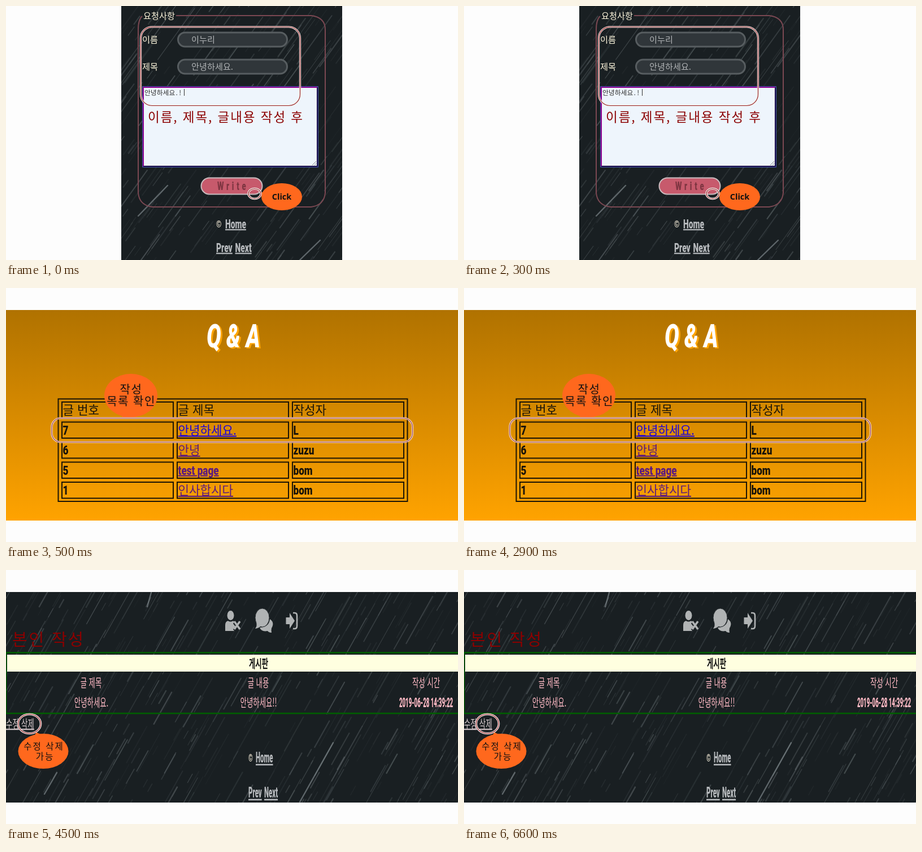
An HTML page for the animation above (8000 ms loop, 800x450 px).

```html
<!DOCTYPE html>
<html lang="ko">
<head>
<meta charset="utf-8">
<title>Q &amp; A board</title>
<style>
  html, body { margin: 0; width: 100%; height: 100%; overflow: hidden; background: #fdfdfd; }
  svg { display: block; }
  #stage { width: 100vw; height: 100vh; }
  text { font-family: "Noto Sans CJK KR", "Noto Sans CJK", "Noto Sans CJK JP", sans-serif; white-space: pre; }
  .heavy { font-family: Roboto, "Noto Sans CJK KR", sans-serif; font-weight: 900; }
  .label { font-family: "Open Sans", sans-serif; font-weight: 700; }
  .mono { font-family: "Noto Sans Mono CJK KR", "Noto Sans CJK KR", monospace; }
  .bold { font-weight: 700; }
  .link { text-decoration: underline; }
</style>
</head>
<body>
<svg id="stage" viewBox="0 0 800 450"></svg>
<script>
const LOOP = 8000;
const STARTS = [0, 500, 4500];
const ORANGE = '#ff681d', DARK_RED = '#8b0000', PINK = '#ffb9c4', SILVER = '#b7babd';

function text(str, x, y, size, fill, { cls = '', squeeze = 1, gap = 0, anchor = 'start', style = '' } = {}) {
  return `<text class="${cls}" transform="translate(${x} ${y}) scale(${squeeze} 1)" font-size="${size}"
    fill="${fill}" letter-spacing="${gap}" text-anchor="${anchor}" style="${style}">${str}</text>`;
}

function box(x, y, w, h, r, fill, stroke = 'none', width = 0) {
  return `<rect x="${x}" y="${y}" width="${w}" height="${h}" rx="${r}" fill="${fill}" stroke="${stroke}" stroke-width="${width}"/>`;
}

const path = (d, fill, stroke = 'none', width = 0) =>
  `<path d="${d}" fill="${fill}" stroke="${stroke}" stroke-width="${width}"/>`;

// Highlight outline: white line with a thin red core
const outline = (x, y, w, h, r) =>
  box(x, y, w, h, r, 'none', '#f6eeee', 3.2) + box(x, y, w, h, r, 'none', '#922222', 1.1);

const oval = (cx, cy, rx, ry) => ['#f6eeee', '#922222'].map((color, i) =>
  `<ellipse cx="${cx}" cy="${cy}" rx="${rx}" ry="${ry}" fill="none" stroke="${color}" stroke-width="${i ? 1.1 : 3.6}"/>`).join('');

const bubble = (cx, cy, rx, ry, tail) =>
  `<ellipse cx="${cx}" cy="${cy}" rx="${rx}" ry="${ry}" fill="${ORANGE}"/>` + path(tail, ORANGE);

function randomFrom(seed) {
  return () => (seed = (seed * 16807) % 2147483647) / 2147483647;
}

// Slanted streaks over a dark ground; lean is the sideways run per unit of height
function rain(x, y, w, h, lean, count, bright) {
  const random = randomFrom(4711);
  let streaks = '';
  for (let i = 0; i < count; i++) {
    const length = 12 + 85 * random() ** 2;
    const sx = random() * (w + 80) - 60, sy = random() * (h + 70);
    const opacity = 0.05 + 0.24 * random() ** 2;
    streaks += `<path d="M${sx.toFixed(1)} ${sy.toFixed(1)}l${(length * lean).toFixed(1)} ${(-length).toFixed(1)}"
      stroke-opacity="${opacity.toFixed(2)}" stroke-width="${(0.8 + 1.5 * random()).toFixed(1)}"/>`;
  }
  return `<svg x="${x}" y="${y}" width="${w}" height="${h}">
    <rect width="100%" height="100%" fill="#191f22"/>
    <g stroke="#aab5b8" stroke-linecap="round">${streaks}
    <path d="${bright}" stroke-opacity=".48" stroke-width="2.4"/></g></svg>`;
}

function footer(x, linkX, nextX, y1, y2, size, squeeze) {
  const link = { cls: 'heavy link', squeeze };
  return text('©', x, y1 - 2, size * 0.72, '#fff5e0', { cls: 'heavy', squeeze: squeeze * 1.2 }) +
    text('Home', linkX, y1, size, SILVER, link) +
    text('Prev', x, y2, size, SILVER, link) +
    text('Next', nextX, y2, size, SILVER, link);
}

function formScene() {
  const field = (y, label, value) =>
    text(label, 241, y + 19, 15.2, '#fff6dc') +
    box(304.5, y + 1, 193, 25, 12.5, '#30363a', '#575d60', 3) +
    text(value, 328, y + 19, 15.2, '#b0b3b5');
  return rain(204, 0, 391, 450, 0.72, 330, 'M316 450L352 415M30 372L82 318') +
    path('M301 17H540Q565 20 565 42V331Q563 353 540 356H259Q236 353 234 331V42Q234 24 241 18', 'none', '#7b4852', 2) +
    text('요청사항', 243, 22.5, 15.2, '#fff6dc') +
    field(46, '이름', '이누리') +
    field(94, '제목', '안녕하세요.') +
    box(241, 142, 312, 144, 1, '#4054a8') +
    path('M242 143H552L549 146H245V282L242 285Z', '#8b008b') +
    path('M552 143V285H242L245 282H549V146Z', '#1b0d45') +
    box(244, 145, 306, 138, 0, '#eef5fc') +
    path('M542 282l7-7M546 282l3-3', 'none', '#888', 1) +
    text('안녕하세요.!', 245, 157.5, 11.8, '#333', { cls: 'mono', style: 'font-weight:300' }) +
    path('M315.5 147V159', 'none', '#333', 1) +
    outline(238.5, 37, 282, 139.5, 20) +
    text('이름, 제목, 글내용 작성 후', 251, 204.5, 22.5, DARK_RED, { gap: 1.95 }) +
    box(345.5, 304.5, 108, 29, 14.5, '#c75a6c', '#c9bcbf', 2) +
    text('Write', 374, 326, 21, '#7e3541', { cls: 'heavy', squeeze: 0.63, gap: 7.5 }) +
    bubble(488, 338, 36, 24, 'M449 331Q458 331 464 320L460 348Q456 337 449 331Z') +
    oval(440, 332.5, 11, 9) +
    text('Click', 488, 343, 14.5, '#111', { cls: 'label', anchor: 'middle' }) +
    footer(372, 388, 405.5, 394, 436, 22, 0.63);
}

function listScene() {
  const rows = [['글 번호', '글 제목', '작성자'], ['7', '안녕하세요.', 'L'], ['6', '안녕', 'zuzu'],
    ['5', 'test page', 'bom'], ['1', '인사합시다', 'bom']];
  let table = box(92.5, 196.5, 618, 181.5, 0, 'none', '#1b1405', 2);
  rows.forEach((row, r) => row.forEach((str, c) => {
    const x = 99 + 204 * c, y = 202 + 35.5 * r;
    const latin = /^\w/.test(str);
    const isLink = r > 0 && c === 1;
    const color = !isLink ? '#17130a' : r === 1 ? '#1800e0' : '#5b1a80';
    table += box(x, y, 197, 28.5, 0, 'none', '#1b1405', 2) +
      text(str, x + 1.5, y + 22, latin ? 22 : 21.2, color,
        { cls: (latin ? 'heavy' : '') + (isLink ? ' link' : ''), squeeze: latin ? 0.78 : 1 });
  }));
  const title = (x, y, color) => text('Q &amp; A', x, y, 57, color,
    { cls: 'heavy', squeeze: 0.67, style: 'font-style:italic' });
  return `<linearGradient id="amber" x2="0" y2="1"><stop stop-color="#b07200"/>
    <stop offset="1" stop-color="#ffa300"/></linearGradient>` +
    box(0, 39, 800, 373, 0, 'url(#amber)') +
    title(358, 106.5, '#ffa500') + title(355, 104.5, '#fff') +
    table +
    bubble(221, 190.5, 47, 38.5, 'M196 220Q208 225 205 232L233 228Z') +
    text('작성', 221.5, 187, 20, '#111', { gap: 1.5, anchor: 'middle' }) +
    text('목록 확인', 221.5, 208, 20, '#111', { gap: 1.5, anchor: 'middle' }) +
    outline(81, 230.5, 638.5, 42.5, 16);
}

function icons() {
  return `<g fill="#b0b3b4"><ellipse cx="397.5" cy="80.5" rx="6" ry="8.5"/>` +
    path('M388 108V98Q388 91 393 90Q397 93 402 90L404 92L402 95L406 100L402 105L404 108Z', '#b0b3b4') +
    path('M404 91L414 105M414 91L404 105', 'none', '#b0b3b4', 3.6) +
    path('M470 111Q465 111 463 108Q452 110 449 102Q466 101 467 87Q476 93 470 103Q469 107 470 111Z', '#b0b3b4') +
    `<ellipse cx="453.5" cy="84.5" rx="12.5" ry="16.5" stroke="#22282b"/>` +
    path('M443 92Q445 99 441 104Q448 103 451 99Z', '#b0b3b4') +
    path('M495.5 84H502V76L511 90L502 104V96H495.5Z', '#b0b3b4') +
    path('M508 76H511Q515 76 515 81V99Q515 104 511 104H508', 'none', '#b0b3b4', 2.6) + '</g>';
}

function postScene() {
  const squeeze = 0.59;
  const cell = (str, x, y) => text(str, x, y, 21, PINK, { squeeze, anchor: 'middle' });
  const action = (str, x) => text(str, x, 280, 21, '#d6c9cc', { cls: 'link', squeeze });
  return rain(0, 39, 800, 373, 0.56, 520, 'M520 372L579 267M68 358L90 320M250 26L257 1') +
    icons() +
    text('본인 작성', 11, 134, 29, DARK_RED, { gap: 2.8 }) +
    box(0, 146.5, 820, 107.5, 0, 'none', '#005f00', 2.6) +
    box(2, 150, 798, 30, 0, '#ffffe0') +
    text('게시판', 447, 173, 21, '#111', { cls: 'bold', squeeze, anchor: 'middle' }) +
    cell('글 제목', 150.5, 206.5) + cell('글 내용', 446.5, 206.5) + cell('작성 시간', 743.5, 206.5) +
    cell('안녕하세요.', 151, 242) + cell('안녕하세요!!', 447, 242) +
    text('2019-06-28 14:39:22', 743.5, 242.5, 23, PINK, { cls: 'heavy', squeeze: 0.42, anchor: 'middle' }) +
    action('수정', 0) + action('삭제', 27) +
    bubble(66, 321, 44.5, 31, 'M36 299Q54 295 53 286Q56 290 66 292Z') +
    oval(41.5, 272.5, 20, 17) +
    text('수정 삭제', 67, 318, 15.5, '#111', { gap: 2, anchor: 'middle' }) +
    text('가능', 69, 336, 15.5, '#111', { gap: 2, anchor: 'middle' }) +
    footer(429, 442, 457, 341, 403, 26, 0.44);
}

const stage = document.getElementById('stage');
stage.innerHTML = [formScene, listScene, postScene].map(scene => `<g>${scene()}</g>`).join('');
const scenes = [...stage.children];

function show(now) {
  const time = now % LOOP;
  const current = STARTS.filter(start => start <= time).length - 1;
  scenes.forEach((scene, i) => scene.style.display = i === current ? '' : 'none');
}

const origin = performance.now();
function tick() {
  show(performance.now() - origin);
  requestAnimationFrame(tick);
}
tick();
</script>
</body>
</html>
```
